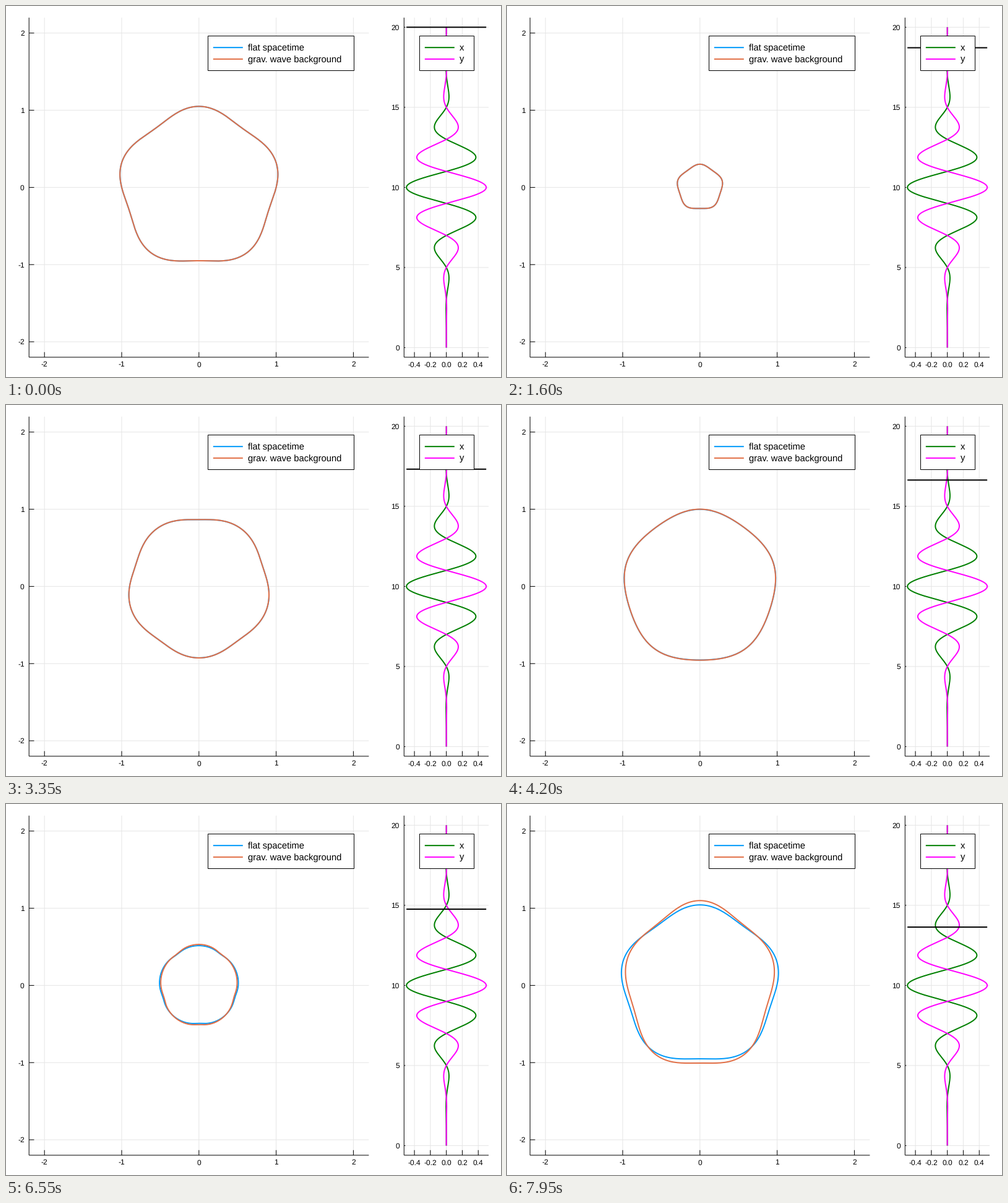
These frames come from a looping animation (800x600 px, 8 s). A matplotlib script:

```python
import numpy as np
import matplotlib.pyplot as plt
from matplotlib.animation import FuncAnimation
from matplotlib.patches import Rectangle

W, H, DPI = 800, 600, 100
PX = 72 / DPI
FRAMES, STEP, T_END = 160, 0.04, 20.0
BLUE, ORANGE, GREEN, MAGENTA = "#009afa", "#e26f46", "#008000", "#ff00ff"
MODES = np.array([1, 4, 6])
AMP = 0.025

plt.rcParams["font.family"] = "Liberation Sans"
plt.rcParams["text.hinting"] = "none"
fig = plt.figure(figsize=(W / DPI, H / DPI), dpi=DPI, facecolor="white")
ax = fig.add_axes([0, 0, 1, 1])
ax.set_xlim(0, W)
ax.set_ylim(H, 0)
ax.axis("off")


class Panel:
    """Rectangular plot area mapping data to stage pixels."""

    def __init__(self, left, right, xlim, ylim, top=18.8, bottom=568.0):
        self.left, self.right, self.top, self.bottom = left, right, top, bottom
        self.xlim, self.ylim = xlim, ylim

    def x(self, v):
        lo, hi = self.xlim
        return self.left + (v - lo) / (hi - lo) * (self.right - self.left)

    def y(self, v):
        lo, hi = self.ylim
        return self.bottom - (v - lo) / (hi - lo) * (self.bottom - self.top)

    def frame(self, xticks, yticks, fmt):
        xlen = 0.015 * (self.bottom - self.top)
        ylen = 0.015 * (self.right - self.left)
        for v in xticks:
            x = self.x(v)
            line([x, x], [self.top, self.bottom], "#e6e6e6", 1, 1)
            line([x, x], [self.bottom, self.bottom - xlen], "black", 1, 2)
            label(x, 583.4, fmt % v, 12, "center")
        for v in yticks:
            y = self.y(v)
            line([self.left, self.right], [y, y], "#e6e6e6", 1, 1)
            line([self.left, self.left + ylen], [y, y], "black", 1, 2)
            label(self.left - 7.5, y + 4.3, "%d" % v, 12, "right")
        line([self.left, self.left], [self.top, self.bottom], "black", 1, 2)
        line([self.left, self.right], [self.bottom, self.bottom], "black", 1, 2)


def line(x, y, color, width, z):
    return ax.plot(x, y, color=color, lw=width * PX, zorder=z, snap=False,
                   solid_capstyle="butt", solid_joinstyle="round")[0]


def label(x, y, s, size, ha="left"):
    ax.text(x, y, s, fontsize=size * PX, ha=ha, va="baseline", zorder=9)


def legend(x, width, entries):
    top, height = 48.5, 56
    ax.add_patch(Rectangle((x, top), width, height, fc="white", ec="black",
                           lw=PX, zorder=7, snap=False))
    for k, (name, color) in enumerate(entries):
        y = top + height * (k + 1) / 3
        line([x + 8.3, x + 56.3], [y, y], color, 2, 8)
        label(x + 64.5, y + 5, name, 14.8)


def wave(u):
    w = u - 10
    return -0.5 * np.exp(-0.08 * w**2) * np.cos(np.pi * w / 2)


def amplitudes(sign, sub=5):
    """Mode amplitudes of a'' = (sign * h - n^2) a at every frame, by RK4."""
    dt = STEP / sub

    def rate(t, s):
        return np.array([s[1], (sign * wave(T_END - t) - MODES**2) * s[0]])

    s = np.array([np.ones(3), np.zeros(3)])
    out = [s[0]]
    for k in range((FRAMES - 1) * sub):
        t = k * dt
        k1 = rate(t, s)
        k2 = rate(t + dt / 2, s + dt / 2 * k1)
        k3 = rate(t + dt / 2, s + dt / 2 * k2)
        k4 = rate(t + dt, s + dt * k3)
        s = s + dt / 6 * (k1 + 2 * k2 + 2 * k3 + k4)
        if (k + 1) % sub == 0:
            out.append(s[0])
    return np.array(out)


sigma = np.linspace(0, 2 * np.pi, 241)


def loop(ax_, ay_):
    """Closed string: circle plus a five-lobed ripple (modes 4 and 6)."""
    x = ax_[0] * np.cos(sigma) + AMP * (
        ax_[1] * np.sin(4 * sigma) + ax_[2] * np.sin(6 * sigma))
    y = ay_[0] * np.sin(sigma) + AMP * (
        ay_[1] * np.cos(4 * sigma) - ay_[2] * np.cos(6 * sigma))
    return main.x(x), main.y(y)


main = Panel(37.2, 586.4, (-2.2, 2.2), (-2.2, 2.2))
side = Panel(643.3, 780.0, (-0.53, 0.53), (-0.6, 20.6))
main.frame(range(-2, 3), range(-2, 3), "%d")
side.frame([-0.4, -0.2, 0.0, 0.2, 0.4], range(0, 21, 5), "%.1f")

u = np.linspace(0, T_END, 501)
line(side.x(wave(u)), side.y(u), GREEN, 2, 3)
line(side.x(-wave(u)), side.y(u), MAGENTA, 2, 4)
marker = line([side.x(-0.5), side.x(0.5)], [0, 0], "black", 2, 5)
flat = line([], [], BLUE, 2, 3)
bent = line([], [], ORANGE, 2, 4)

legend(326.5, 236, [("flat spacetime", BLUE),
                    ("grav. wave background", ORANGE)])
legend(668.5, 88, [("x", GREEN), ("y", MAGENTA)])

amp_x, amp_y = amplitudes(1), amplitudes(-1)


def update(i):
    t = i * STEP
    free = np.cos(MODES * t)
    flat.set_data(*loop(free, free))
    bent.set_data(*loop(amp_x[i], amp_y[i]))
    y = side.y(T_END - t)
    marker.set_ydata([y, y])
    return flat, bent, marker


anim = FuncAnimation(fig, update, frames=FRAMES, interval=50,
                     repeat=True, repeat_delay=0, blit=False)
plt.show()
```
